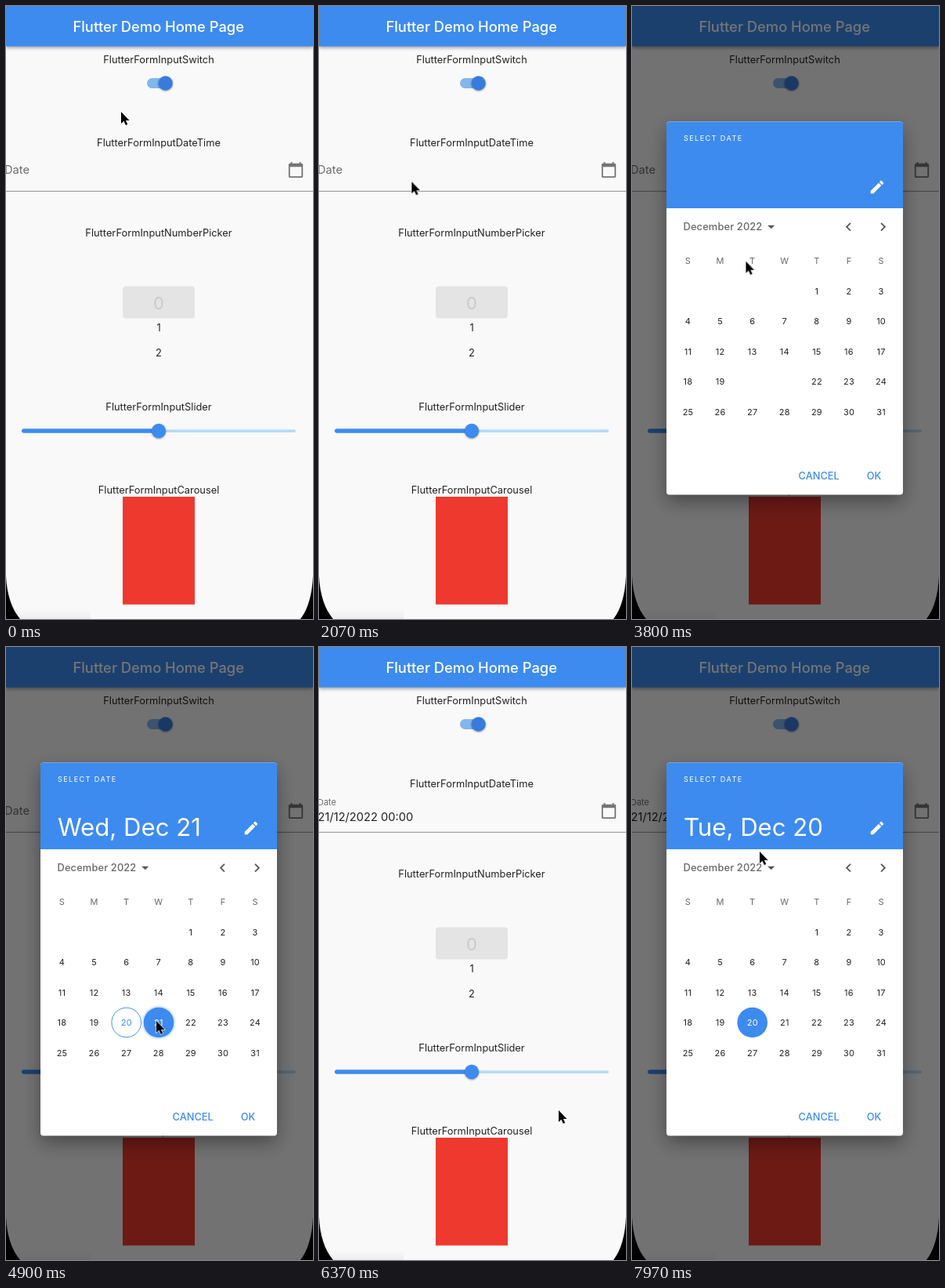
Write an HTML page that moves like this. It is 392 px wide and 782 px high and loops after 8 s.

```html
<!DOCTYPE html>
<html lang="en">
<head>
<meta charset="utf-8">
<title>Form inputs</title>
<style>
  html, body { margin: 0; width: 100%; height: 100%; overflow: hidden; background: #f9f9f9; }
  svg { display: block; width: 392px; height: 782px; font: 12.83px Inter, "Open Sans", sans-serif; }
  text { fill: #222; }
  .mid { text-anchor: middle; }
  .title { font-size: 18.33px; font-weight: 500; fill: #fff; }
  .bar { fill: #3d8bef; filter: drop-shadow(0 2px 2px rgba(0,0,0,.35)); }
  .blue { fill: #3d8bef; }
  .white { fill: #fff; }
  .field { font-size: 14.67px; }
  .small { font-size: 11px; letter-spacing: .25px; }
  .muted { fill: #666; }
  .medium { font-weight: 500; }
  .headline { font-size: 31.17px; fill: #fff; }
  .thumb { filter: drop-shadow(0 1px 1px rgba(0,0,0,.35)); }
  .sheet { fill: #fff; filter: drop-shadow(0 9px 12px rgba(0,0,0,.38)); }
</style>
</head>
<body>
<svg viewBox="0 0 392 782">
  <defs>
    <linearGradient id="fade" x2="0" y2="1">
      <stop stop-color="#000" stop-opacity="0"/><stop offset="1" stop-color="#000" stop-opacity=".05"/>
    </linearGradient>
    <path id="calendar" transform="translate(359 198) scale(.9167)" d="M20 3h-1V1h-2v2H7V1H5v2H4c-1.1 0-2 .9-2 2v16c0 1.1.9 2 2 2h16c1.1 0 2-.9 2-2V5c0-1.1-.9-2-2-2zm0 18H4V8h16v13z"/>
  </defs>

  <rect width="392" height="782" fill="#f9f9f9"/>
  <rect class="bar" width="392" height="51.5"/>
  <text class="mid title" x="194.7" y="32.5">Flutter Demo Home Page</text>
  <g id="labels"></g>

  <rect id="track" x="180" y="92.1" width="30.2" height="12.8" rx="6.4"/>
  <g id="knob">
    <circle id="halo" cx="186.4" cy="98.5" r="18" fill="#777"/>
    <circle id="thumb" class="thumb" cx="186.4" cy="98.5" r="9.2"/>
  </g>

  <g id="dateLabel"><text class="field" style="fill:#6b6b6b">Date</text></g>
  <text id="dateValue" class="field" x="-1.5" y="221.7">21/12/2022 00:00</text>
  <rect y="235.8" width="392" height="1" fill="#8c8c8c"/>
  <use href="#calendar" fill="#757575"/>
  <use id="focus" href="#calendar" class="blue"/>

  <rect x="149" y="357.5" width="92" height="41" rx="4" fill="#e4e4e4"/>
  <text class="mid" x="195" y="386.5" style="font-size:22px;fill:#cacaca">0</text>
  <text class="mid" x="195" y="414.7">1</text>
  <text class="mid" x="195" y="446.7">2</text>

  <rect x="190" y="540.2" width="180" height="3.7" rx="1.85" fill="#b7dafa"/>
  <rect class="blue" x="20" y="539.3" width="175" height="5.5" rx="2.75"/>
  <circle class="blue thumb" cx="195" cy="542" r="9.2"/>

  <rect x="149" y="626" width="92" height="137.5" fill="#ee392e"/>
  <rect x="10" y="770" width="98" height="12" fill="url(#fade)"/>

  <g id="dialog">
    <rect width="392" height="782" fill-opacity=".54"/>
    <rect class="sheet" x="44" y="147.5" width="302" height="476" rx="3.7"/>
    <path class="blue" d="M44 258V151.2a3.7 3.7 0 0 1 3.7-3.7H342.3a3.7 3.7 0 0 1 3.7 3.7V258z"/>
    <text class="white" x="66" y="171.6" style="font-size:9.17px;letter-spacing:1.37px">SELECT DATE</text>
    <path class="white" transform="translate(302 220) scale(.9167)" d="M3 17.25V21h3.75L17.81 9.94l-3.75-3.75L3 17.25zM20.71 7.04c.39-.39.39-1.02 0-1.41l-2.34-2.34c-.39-.39-1.02-.39-1.41 0l-1.83 1.83 3.75 3.75 1.83-1.83z"/>
    <text class="medium muted" x="65.5" y="286" style="letter-spacing:.15px">December 2022</text>
    <g fill="#585858">
      <path transform="translate(166.7 270.5) scale(.9167)" d="M7 10l5 5 5-5z"/>
      <path transform="translate(265.5 270.7) scale(.9167)" d="M15.41 7.41L14 6l-6 6 6 6 1.41-1.41L10.83 12z"/>
      <path transform="translate(309.5 270.7) scale(.9167)" d="M10 6L8.59 7.41 13.17 12l-4.58 4.59L10 18l6-6z"/>
    </g>
    <g id="days"></g>
    <g id="pick20">
      <text class="headline" x="66" y="241.3">Tue, Dec 20</text>
      <circle class="blue" cx="153.7" cy="479" r="19.3"/>
      <text class="mid small white" x="153.8" y="483">20</text>
      <text class="mid small" x="194.9" y="483">21</text>
    </g>
    <g id="pick21">
      <text class="headline" x="66" y="241.3">Wed, Dec 21</text>
      <circle cx="153.7" cy="479" r="18.8" fill="none" stroke="#3d95e6"/>
      <text class="mid small blue" x="153.8" y="483">20</text>
      <circle id="dayRipple" class="blue" cx="195" cy="479" r="21.5"/>
      <circle class="blue" cx="195" cy="479" r="19.3"/>
      <text class="mid small white" x="194.9" y="483">21</text>
    </g>
    <rect id="okPress" x="280" y="583" width="59" height="33" rx="3.7" fill="#e6e6e6"/>
    <text class="medium blue" x="212.5" y="603.7">CANCEL</text>
    <text class="medium blue" x="299.7" y="603.7">OK</text>
    <g id="okRipple"><circle class="blue" r="13" fill-opacity=".25"/></g>
  </g>

  <path d="M0 727C1 750 7 769 18 782H0zM392 727C391 750 386 769 376 782H392z"/>
  <path id="cursor" d="M0 0V15l3.4-3.2 2.4 5.3 2.5-1.1-2.4-5.1H10.6z" stroke="#fff" stroke-width="1.1" paint-order="stroke"/>
</svg>
<script>
const LOOP = 8000;
const $ = id => document.getElementById(id);

function addText(parent, x, y, content, cls) {
  const el = document.createElementNS('http://www.w3.org/2000/svg', 'text');
  el.setAttribute('x', x);
  el.setAttribute('y', y);
  el.setAttribute('class', 'mid ' + cls);
  el.textContent = content;
  parent.append(el);
}

// steps: [ms, value]; two steps at the same ms make a hard change
function play(id, prop, steps, easing = 'linear') {
  const all = [[0, steps[0][1]], ...steps, [LOOP, steps.at(-1)[1]]];
  $(id).animate(all.map(([ms, value]) => ({ offset: ms / LOOP, [prop]: value, easing })),
    { duration: LOOP, iterations: Infinity });
}

// ranges: [fade-in start, fully shown, fade-out start, gone]
const show = (id, ...ranges) => play(id, 'opacity',
  ranges.flatMap(([a, b, c, d]) => [[a, 0], [b, 1], [c, 1], [d, 0]]));

const at = (x, y, scale = 1) => `translate(${x}px, ${y}px) scale(${scale})`;

[['Switch', 73], ['DateTime', 178.5], ['NumberPicker', 294.2], ['Slider', 516.4], ['Carousel', 622]]
  .forEach(([name, y]) => addText($('labels'), 195, y, 'FlutterFormInput' + name, ''));

const column = i => 71.5 + 41.1 * i;
[...'SMTWTFS'].forEach((d, i) => addText($('days'), column(i), 329, d, 'small muted'));
for (let day = 1; day <= 31; day++) {
  if (day === 20 || day === 21) continue;
  const cell = day + 3;
  addText($('days'), column(cell % 7), 367.6 + 38.5 * Math.floor(cell / 7), day, 'small');
}

const toggled = (on, off) => [[880, on], [1080, off], [1620, off], [1820, on]];
play('knob', 'transform', toggled(at(17.3, 0), at(0, 0)), 'ease-in-out');
play('track', 'fill', toggled('#82b6ed', '#9c9c9c'));
play('thumb', 'fill', toggled('#387bdd', '#fafafa'));
play('halo', 'opacity', [[800, 0], [880, .12], [960, .12], [1110, 0], [1600, 0], [1660, .12], [1740, .12], [1900, 0]]);

play('cursor', 'transform', [
  [30, at(147, 135)], [760, at(198, 95)], [1780, at(198, 95)], [2130, at(113.5, 232)],
  [2270, at(113.5, 232)], [2430, at(113.5, 222)], [3400, at(113.5, 222)], [4300, at(192, 477)],
  [5050, at(192, 477)], [6000, at(305, 596)], [6310, at(305, 596)], [6370, at(306, 591)],
  [7170, at(163, 216)], [7750, at(163, 216)], [7950, at(163, 261)]
], 'ease-in-out');

show('focus', [3100, 3160, 3300, 3360], [7600, 7660, 7800, 7860]);
show('dialog', [3220, 3370, 6310, 6360], [7710, 7860, LOOP, LOOP]);
show('pick20', [0, 0, 4800, 4800], [6370, 6370, LOOP, LOOP]);
show('pick21', [4800, 4800, 6370, 6370]);
play('dayRipple', 'opacity', [[4740, 0], [4840, .2], [4930, .2], [5130, 0]]);
show('okPress', [6160, 6230, 6360, 6370]);
show('okRipple', [6160, 6220, 6360, 6370]);
play('okRipple', 'transform', [[6160, at(305, 602, .3)], [6290, at(305, 602)]]);

play('dateLabel', 'transform', [[6210, at(-2, 214.2)], [6290, at(-2, 202, .75)]], 'ease-out');
show('dateValue', [6210, 6290, LOOP, LOOP]);
</script>
</body>
</html>
```
